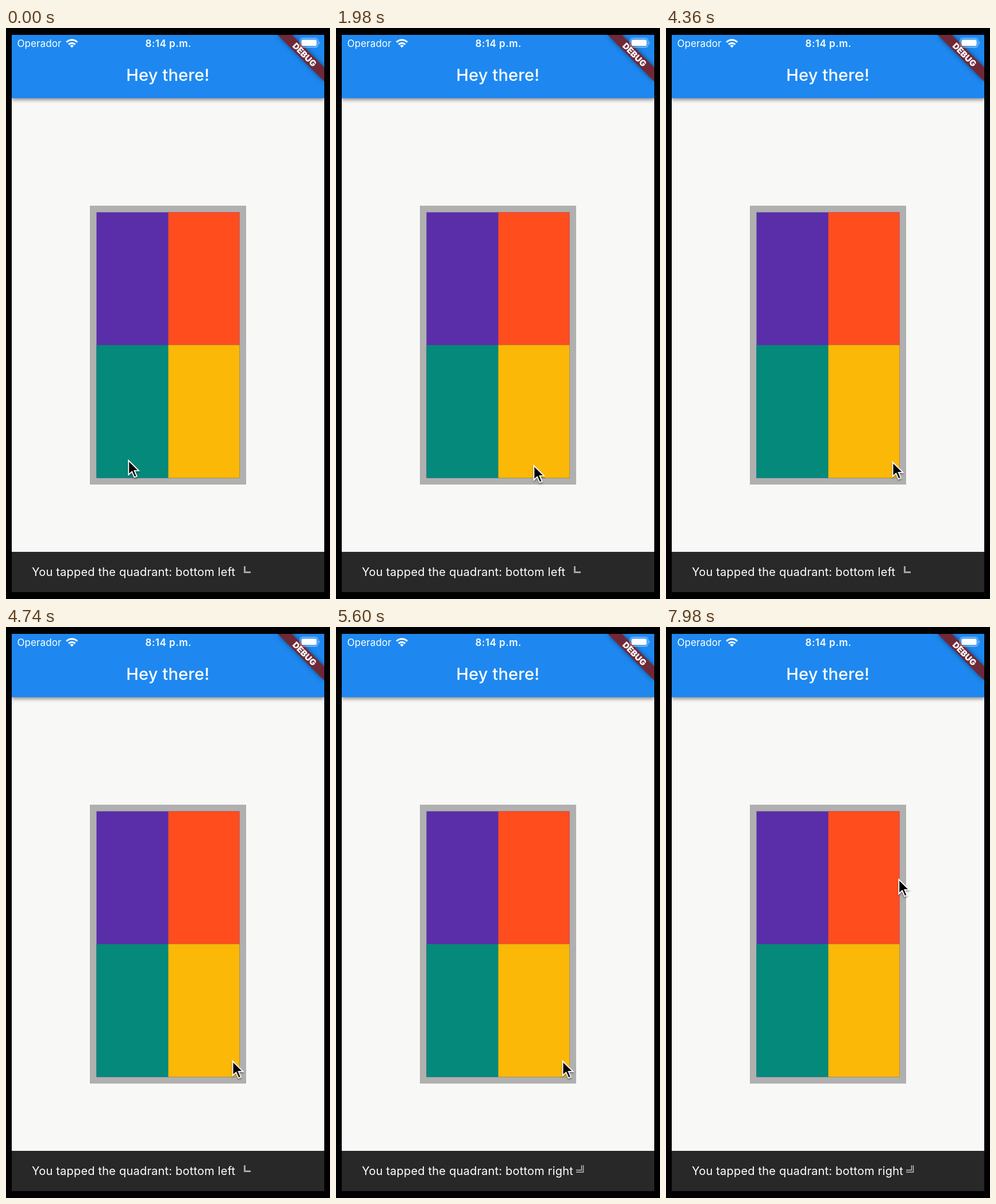
Animation of 564 by 993 pixels, one loop 8 s. Source, as an HTML page:

```html
<!DOCTYPE html>
<html lang="en">
<head>
<meta charset="utf-8">
<title>Quadrants</title>
<style>
html, body { margin: 0; width: 100%; height: 100%; overflow: hidden; background: #000; }
svg { display: block; width: 564px; height: 993px; }
text { font-family: Inter, Roboto, sans-serif; fill: #fff; }

.bar { filter: drop-shadow(0 3px 3px rgba(0, 0, 0, .45)); }
.ribbon { filter: drop-shadow(0 0 4px rgba(0, 0, 0, .5)); }
.message { font-size: 20px; letter-spacing: .2px; }
.pointer { filter: drop-shadow(0 2px 1.5px rgba(0, 0, 0, .4)); }

.leaving, .entering, .entering g, .pointer { animation: 8s linear infinite; }
.leaving { animation-name: leave; }
.entering { animation-name: enter; }
.entering g { animation-name: reveal; }
.pointer { animation-name: move; }

@keyframes leave {
  0% { transform: none; }
  61% { transform: none; animation-timing-function: cubic-bezier(.8, 0, .6, 1); }
  64.125%, 100% { transform: translateY(70px); }
}
@keyframes enter {
  0% { transform: translateY(70px); }
  64.875% { transform: translateY(70px); animation-timing-function: cubic-bezier(.4, 0, .2, 1); }
  68%, 100% { transform: none; }
}
@keyframes reveal {
  0%, 67.125% { opacity: 0; }
  68%, 100% { opacity: 1; }
}
@keyframes move {
  0% { transform: translate(213px, 751px); }
  15.75% { transform: translate(213px, 751px); animation-timing-function: ease-in-out; }
  17.5% { transform: translate(206px, 749px); animation-timing-function: ease-in; }
  24.75% { transform: translate(344px, 760px); animation-timing-function: ease-out; }
  33%, 38.75% { transform: translate(391.5px, 753px); }
  46%, 88.5% { transform: translate(394.3px, 754px); animation-timing-function: ease-in-out; }
  99.75%, 100% { transform: translate(405px, 438px); }
}
</style>
</head>
<body>
<svg viewBox="0 0 564 993">
  <defs>
    <clipPath id="screen"><rect x="10" y="12" width="544" height="968.5"/></clipPath>
  </defs>

  <g clip-path="url(#screen)">
    <rect x="10" y="12" width="544" height="969" fill="#f8f8f7"/>
    <rect class="bar" x="10" y="2" width="544" height="120" fill="#1e88f0"/>
    <text x="281.7" y="91.5" font-size="29" font-weight="500" letter-spacing=".15" text-anchor="middle">Hey there!</text>

    <rect x="146" y="309" width="272" height="485" fill="#b0b0b0"/>
    <rect x="157.5" y="320.5" width="249" height="462" fill="#5a2ea8"/>
    <rect x="282.5" y="320.5" width="124" height="462" fill="#ff4d1e"/>
    <rect x="157.5" y="551.4" width="249" height="231.1" fill="#04897a"/>
    <rect x="282.5" y="551.4" width="124" height="231.1" fill="#fcb806"/>

    <g class="leaving">
      <rect x="10" y="911" width="544" height="70" fill="#282828"/>
      <text class="message" x="45" y="953">You tapped the quadrant: bottom left</text>
      <path d="M415.5 936V946.5H426" fill="none" stroke="#a5a5a5" stroke-width="3"/>
    </g>
    <g class="entering">
      <rect x="10" y="911" width="544" height="70" fill="#282828"/>
      <g>
        <text class="message" x="45" y="953">You tapped the quadrant: bottom right</text>
        <path d="M427.5 936V944.5H418M430.5 936V948H418" fill="none" stroke="#c4c4c4" stroke-width="1.4"/>
      </g>
    </g>

    <g class="ribbon">
      <path d="M473 12H497.6L554 68.4V93Z" fill="#702837"/>
    </g>
    <text transform="translate(519.6 46.4) rotate(45)" y="5.3" font-size="14.8" font-weight="900" text-anchor="middle">DEBUG</text>

    <text x="19.5" y="33" font-size="17" letter-spacing=".1">Operador</text>
    <text x="282.7" y="33" font-size="17" font-weight="600" letter-spacing=".5" text-anchor="middle">8:14 p.m.</text>
    <g fill="none" stroke="#fff" stroke-width="3">
      <path d="M105.3 24.6a13.4 13.4 0 0 1 18.8 0"/>
      <path d="M109 28.6a8.2 8.2 0 0 1 11.4 0"/>
    </g>
    <path d="M114.7 34.2l-3.3-3.5a4.8 4.8 0 0 1 6.6 0z" fill="#fff"/>
    <rect x="512" y="18" width="31" height="15.5" rx="4.5" fill="none" stroke="#fff" stroke-opacity=".5" stroke-width="1.4"/>
    <rect x="514.2" y="20.2" width="26.6" height="11.1" rx="2.6" fill="#fff"/>
    <path d="M544.8 23.2q3 2.5 0 5z" fill="#fff" fill-opacity=".55"/>
  </g>

  <g class="pointer">
    <path d="M.3 1V26L6.2 20.6 10.5 30.3 14.7 28.5 10.5 18.9H18.2Z" fill="#000" stroke="#fff" stroke-width="1.9"/>
  </g>
</svg>
</body>
</html>
```
